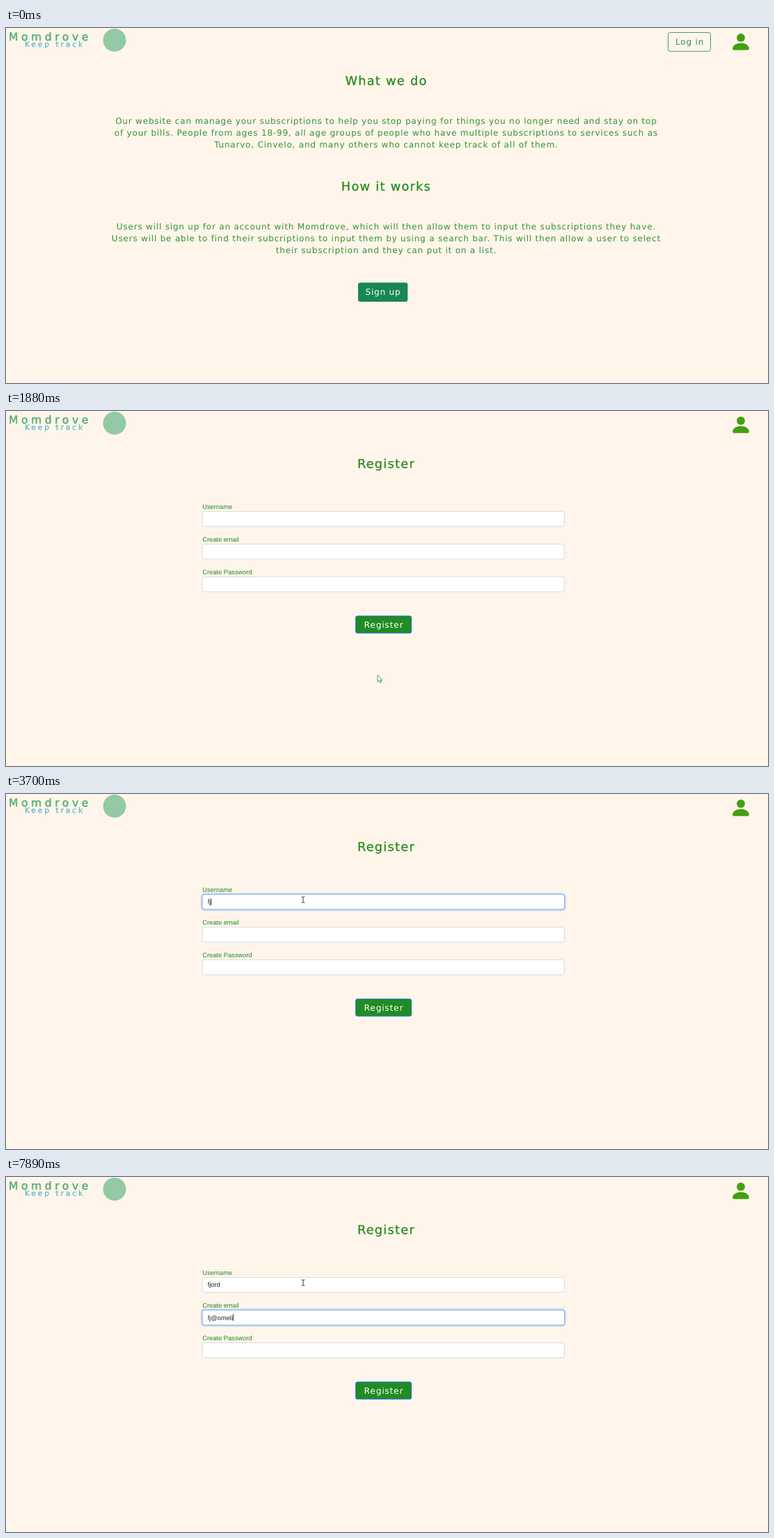
These frames come from a looping animation (1095x511 px, 8 s). An HTML page:

```html
<!DOCTYPE html>
<html lang="en">
<head>
<meta charset="utf-8">
<title>Register</title>
<style>
html, body { margin: 0; width: 100%; height: 100%; overflow: hidden; background: #fff5ea; }
svg { display: block; width: 1095px; height: 511px; }
text { font-family: "DejaVu Sans", sans-serif; fill: #228b22; white-space: pre; text-rendering: geometricPrecision; }
.mid { text-anchor: middle; }
.body { font-size: 12px; letter-spacing: .8px; fill-opacity: .92; }
.head { font-size: 17.6px; letter-spacing: 1.35px; stroke: #228b22; stroke-width: .3px; }
.white { fill: #fff; fill-opacity: 1; }
.label, .value { font-family: "Liberation Sans", Arial, sans-serif; font-size: 9.3px; }
.value { fill: #212529; }
.option { font-family: "Noto Sans", sans-serif; font-size: 7.4px; fill: #111; }
.brand { font-size: 15.5px; letter-spacing: 4.6px; fill: #55b074; stroke: #55b074; stroke-width: .5px; }
.tagline { font-size: 10.5px; letter-spacing: 3px; fill: #58b9cf; stroke: #58b9cf; stroke-width: .3px; }
</style>
</head>
<body>
<svg id="stage" viewBox="0 0 1095 511">
  <text class="brand" x="4" y="18">Momdrove</text>
  <text class="tagline" x="27" y="27.3">Keep track</text>
  <circle cx="156" cy="17.5" r="16.5" fill="#93c9a3"/>
  <g fill="#41a010" transform="translate(1040.2 4.1) scale(1.97)">
    <circle cx="8" cy="5" r="3"/>
    <path d="M3 14S2 14 2 13S3 9 8 9S14 12 14 13S13 14 13 14Z"/>
  </g>
  <g id="home">
    <rect x="951.5" y="6.5" width="61" height="27" rx="3" fill="none" stroke="#198754" stroke-width=".8"/>
    <text class="body mid" x="982.6" y="24.2" style="fill:#198754">Log in</text>
    <rect id="clickRing" x="504.8" y="365.3" width="73.6" height="30" rx="4" fill="none" stroke="#198754" stroke-opacity=".5" stroke-width="2.4"/>
    <rect id="signUp" x="506" y="366.5" width="71.2" height="27.6" rx="3"/>
    <text class="body mid white" x="541.9" y="384.4">Sign up</text>
  </g>
  <g id="register">
    <text class="head mid" x="546.5" y="81.7">Register</text>
    <rect x="502.5" y="295" width="80" height="24.8" rx="2.5" fill="#228b22" stroke="#0d6efd" stroke-width=".9"/>
    <text class="body mid white" x="542.9" y="311.8" style="font-size:12.2px">Register</text>
  </g>
  <g id="cursor">
    <path id="arrow" d="M0 0V10L2.3 7.9L3.8 11.2L5.3 10.5L3.9 7.4H7Z" fill="#fff" stroke-width=".8"/>
    <path id="hand" transform="translate(-3 0)" d="M2.5 1.2q1-1.2 2 0V5.5l4.2 .9q1.1 .3 1 1.5L9 11L8.3 13.5H3.5L.6 8.8q-.2-1.4 1-1L2.5 8.6Z" fill="#fff" stroke="#111" stroke-width=".8"/>
    <path id="beam" d="M-2.3-4H-.5L0-3.5L.5-4H2.3M0-3.5V3.8M-2.3 4.3H-.5L0 3.8L.5 4.3H2.3" fill="none" stroke="#222" stroke-width=".9"/>
  </g>
</svg>
<script>
const LOOP = 8000;
const $ = id => document.getElementById(id);
const clamp = v => Math.min(1, Math.max(0, v));
const ramp = (t, start, length) => clamp((t - start) / length);
const within = (t, start, end) => t >= start && t < end;
const show = (node, on) => node.setAttribute('visibility', on ? 'visible' : 'hidden');

function add(parent, tag, attrs, content = '') {
  const node = document.createElementNS('http://www.w3.org/2000/svg', tag);
  for (const key in attrs) node.setAttribute(key, attrs[key]);
  node.textContent = content;
  parent.appendChild(node);
  return node;
}

function section(title, y, lines) {
  add($('home'), 'text', { class: 'head mid', x: 546.5, y }, title);
  lines.forEach((line, i) =>
    add($('home'), 'text', { class: 'body mid', x: 546.4, y: y + 56 + i * 17.3 }, line));
}
section('What we do', 81.7, [
  'Our website can manage your subscriptions to help you stop paying for things you no longer need and stay on top',
  'of your bills. People from ages 18-99, all age groups of people who have multiple subscriptions to services such as',
  'Tunarvo, Cinvelo, and many others who cannot keep track of all of them.'
]);
section('How it works', 233.7, [
  'Users will sign up for an account with Momdrove, which will then allow them to input the subscriptions they have.',
  'Users will be able to find their subcriptions to input them by using a search bar. This will then allow a user to select',
  'their subscription and they can put it on a list.'
]);

function field(label, y) {
  const form = $('register');
  const box = { x: 282.2, y, width: 520.2, height: 21.4, rx: 3 };
  add(form, 'text', { class: 'label', x: 282.2, y: y - 4 }, label);
  const ring = add(form, 'rect', { ...box, fill: 'none', stroke: '#0d6efd', 'stroke-width': 4.4 });
  add(form, 'rect', { ...box, fill: '#fff', stroke: '#ced4da', 'stroke-width': .8 });
  const edge = add(form, 'rect', { ...box, fill: 'none', stroke: '#86b7fe', 'stroke-width': .9 });
  const value = add(form, 'text', { class: 'value', x: 289.7, y: y + 13.8 });
  const caret = add(form, 'rect', { y: y + 5.6, width: .9, height: 10, fill: '#222' });
  return { ring, edge, value, caret };
}
const userField = field('Username', 144.6);
const emailField = field('Create email', 191.7);
const passwordField = field('Create Password', 238.7);

const menu = add($('register'), 'g', {});
add(menu, 'rect', { x: 281, y: 167.5, width: 118.6, height: 133.6, rx: 2, fill: '#000', opacity: .12 });
add(menu, 'rect', { x: 281.5, y: 167, width: 117.2, height: 133, rx: 1.5, fill: '#fff', stroke: '#ccc', 'stroke-width': .7 });
['jorvin', '720916528x@omeli.test', 'K_4hGBwiUTDNRMcMo', 'Iselin', 'unbatsq+ck7ej@omeli.test', 'nedjorvin8@omeli.test']
  .forEach((entry, i) => add(menu, 'text', { class: 'option', x: 288.5, y: 184.8 + i * 20.63 }, entry));

const USER = { text: 'fjord', keys: [3500, 3700, 3900, 4090, 4350] };
const EMAIL = { text: 'fj@omeli', keys: [6020, 6560, 7020, 7230, 7490, 7590, 7690, 7890] };
const EMPTY = { text: '', keys: [] };

function drawField(f, { text, keys }, t, focus, caretOn) {
  const typed = text.slice(0, keys.filter(k => t >= k).length);
  if (f.value.textContent !== typed) f.value.textContent = typed;
  f.ring.setAttribute('opacity', focus * .25);
  f.edge.setAttribute('opacity', focus);
  f.caret.setAttribute('x', 289.8 + (typed ? f.value.getComputedTextLength() : 0));
  show(f.caret, caretOn);
}

// The pointer moves in even time steps, starting and ending slowly.
function glide(t, from, to, start, step, count) {
  const p = clamp((Math.floor((t - start) / step) + 1) / count);
  const e = p * p * (3 - 2 * p);
  return from.map((v, i) => v + (to[i] - v) * e);
}

function cursorAt(t) {
  return t < 2220
    ? glide(t, [746, 510], [534, 380], 580, 69, 12)
    : glide(t, [534, 380], [427, 152], 2220, 68, 7);
}

function draw(t) {
  const onRegister = t >= 1880;
  show($('home'), !onRegister);
  show($('register'), onRegister);

  const [x, y] = cursorAt(t);
  const overButton = !onRegister && t >= 580 && x > 506 && x < 577 && y > 366 && y < 394;
  const overInput = onRegister && [144, 191, 238].some(top => y > top && y < top + 22);
  const hand = overButton && t < 1680;
  $('cursor').setAttribute('transform', `translate(${x} ${y})`);
  $('arrow').setAttribute('stroke', onRegister ? '#17804c' : '#12331f');
  show($('hand'), hand);
  show($('beam'), overInput);
  show($('arrow'), t >= 580 && !hand && !overInput);
  $('signUp').setAttribute('fill', overButton ? '#157347' : '#198754');
  show($('clickRing'), !onRegister && t >= 1410);

  const leave = ramp(t, 4700, 200);
  drawField(userField, USER, t, ramp(t, 2690, 150) * (1 - leave),
    within(t, 2760, 3300) || within(t, 3500, 4750));
  drawField(emailField, EMAIL, t, leave, within(t, 4750, 5350) || t >= 5880);
  drawField(passwordField, EMPTY, t, 0, false);
  show(menu, within(t, 2832, 3640));
  menu.setAttribute('opacity', 1 - ramp(t, 3480, 150));
}

const begin = performance.now();
function tick() {
  draw((performance.now() - begin) % LOOP);
  requestAnimationFrame(tick);
}
tick();
</script>
</body>
</html>
```
